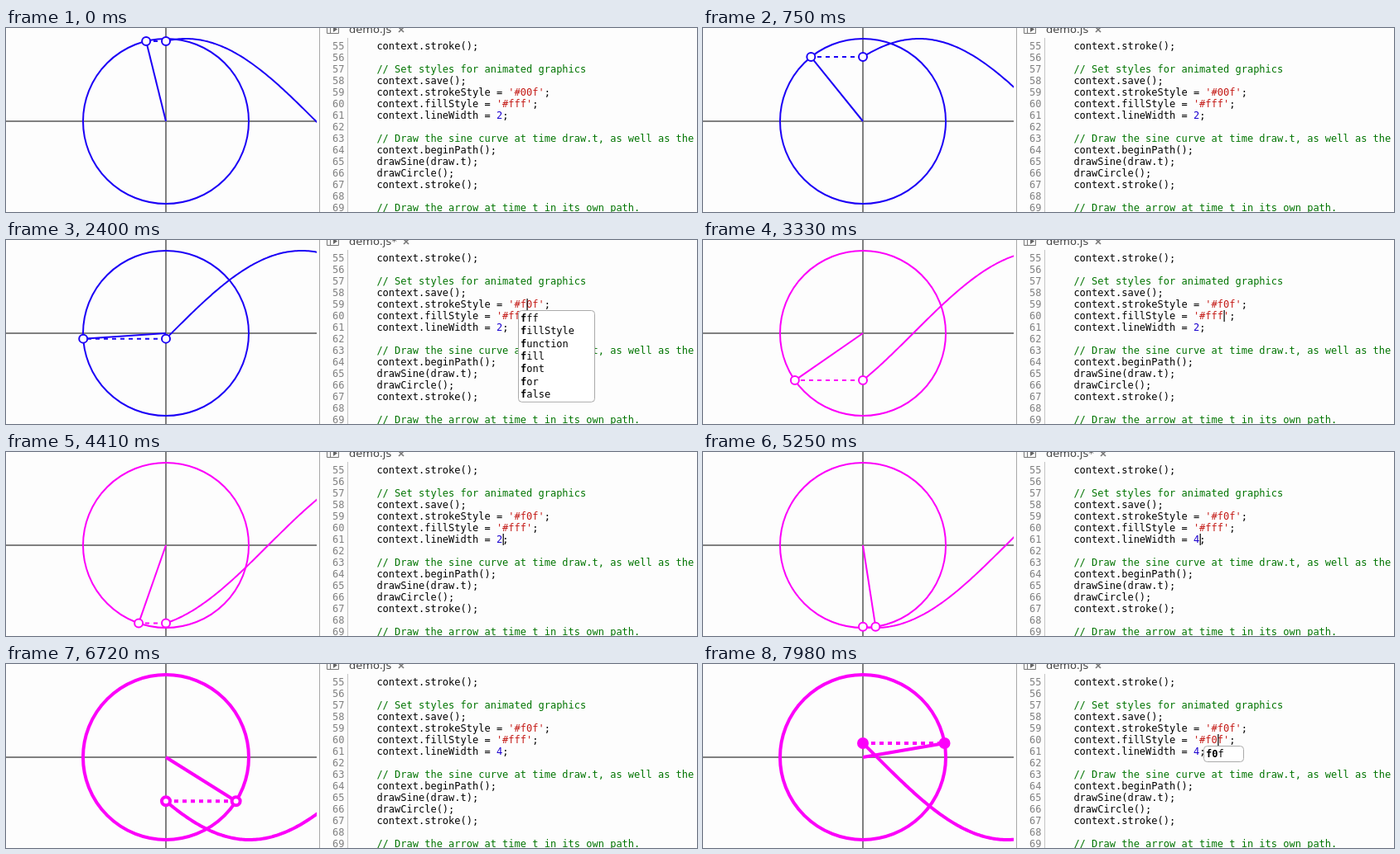
Write an HTML page that moves like this. It is 834 by 223 pixels and loops after 8000 ms.

```html
<!DOCTYPE html>
<html lang="en">
<head>
<meta charset="utf-8">
<title>Sine editor</title>
<style>
  html, body { margin: 0; width: 100%; height: 100%; overflow: hidden; background: #fdfdfd; }
  svg { display: block; }
  text { white-space: pre; }
  .code text { font: 12px "DejaVu Sans Mono", monospace; }
  .num { fill: #808080; text-anchor: end; }
  .comment { fill: #007400; }
  .string { fill: #c41a16; }
  .number { fill: #1c00cf; }
  .tab { font: 13px "DejaVu Sans", sans-serif; fill: #444; }
</style>
</head>
<body>
<svg width="834" height="223" viewBox="0 0 834 223">
  <defs><clipPath id="pane"><rect width="375" height="223"/></clipPath></defs>
  <g clip-path="url(#pane)">
    <path d="M0 113H375M193 0V223" stroke="#808080" stroke-width="2"/>
    <g id="plot" fill="none">
      <path id="wave"/>
      <circle cx="193" cy="113" r="100"/>
      <path id="arm"/>
      <path id="dash" stroke-dasharray="5 5"/>
      <circle id="tip" r="5"/>
      <circle id="foot" cx="193" r="5"/>
    </g>
  </g>
  <path d="M378.5 0V223" stroke="#a8a8a8"/>
  <path d="M412.5 12V223" stroke="#c4c4c4"/>
  <path d="M387.5 -2V6.5H401.5V-2M391.5 -2V6.5" fill="none" stroke="#777"/>
  <path d="M395 -2L400 1.5L395 5Z" fill="#666"/>
  <text class="tab" id="tab" x="414" y="6"></text>
  <path id="close" d="M474 -1L480 5M480 -1L474 5" stroke="#777" stroke-width="1.6"/>
  <g class="code">
    <g id="lines"></g>
    <rect id="caret" width="1.2" height="14"/>
    <g id="hints"></g>
  </g>
</svg>
<script>
const $ = id => document.getElementById(id);
const LOOP = 8000, CX = 193, CY = 113, R = 100;
const LEFT = 447.4, CHAR = 7.224, FIRST = 55, ROW = 14;
const BLUE = '#1c00f6', PINK = '#fc00fa', WHITE = '#fff';
const WORDS = ['fff', 'fillStyle', 'function', 'fill', 'font', 'for', 'false'];

// [time, value] steps; the last one reached holds
const STROKE = [[0, '#00f'], [1860, '#0f'], [2100, '#f0f']];
const FILL = [[0, '#fff'], [6750, '#ff'], [6900, '#f0f']];
const WIDTH = [[0, '2'], [4620, ''], [4860, '4']];
const INK = [[0, BLUE], [2790, PINK]];
const DOT = [[0, WHITE], [7230, PINK]];
const WEIGHT = [[0, 2], [5745, 4]];
const DIRTY = [[0, false], [1890, true], [2760, false], [4950, true],
  [5670, false], [6780, true], [7200, false]];
const POPUP = [[0, ''], [2100, 'f'], [3150, ''], [6900, 'f0']];
// caret: [time, [line, column]]; each step restarts the blink
const CARET = [[0, null], [1380, [59, 25]], [1860, [59, 24]], [2100, [59, 25]],
  [3150, [60, 25]], [3900, [61, 21]], [4620, [61, 20]], [4860, [61, 21]],
  [6150, [60, 24]], [6750, [60, 23]], [6900, [60, 24]]];

const step = (list, t) => list.filter(s => s[0] <= t).pop();
const at = (list, t) => step(list, t)[1];
const span = (kind, s) => `<tspan class="${kind}">${s}</tspan>`;
const col = n => LEFT + n * CHAR;
const base = line => 26 + (line - FIRST) * ROW;
const set = (id, attrs) => {
  for (const k in attrs) $(id).setAttribute(k, attrs[k]);
};

const source = [
  'context.stroke();', '',
  span('comment', '// Set styles for animated graphics'),
  'context.save();', '', '', '', '',
  span('comment', '// Draw the sine curve at time draw.t, as well as the'),
  'context.beginPath();', 'drawSine(draw.t);', 'drawCircle();', 'context.stroke();', '',
  span('comment', '// Draw the arrow at time t in its own path.')
];
$('lines').innerHTML = source.map((s, i) => {
  const line = FIRST + i, y = base(line);
  return `<text class="num" x="408.5" y="${y}">${line}</text>` +
    `<text id="l${line}" x="${LEFT}" y="${y}">${s}</text>`;
}).join('');

const cache = {};
function html(id, s) {
  if (cache[id] !== s) $(id).innerHTML = cache[id] = s;
}

function hintBox(prefix) {
  if (!prefix) return '';
  const many = prefix === 'f';
  const words = many ? WORDS : ['f0f'];
  const x = many ? 618.5 : 604.5, y = many ? 85.5 : 99.5;
  const w = many ? 92 : 48, h = 15.3 * words.length + 3.7;
  return `<rect x="${x}" y="${y}" width="${w}" height="${h}" rx="4" fill="#fff" stroke="#aaa"/>` +
    words.map((s, i) => `<text x="${x + 2.5}" y="${y + 13.5 + i * 15.3}">` +
      `<tspan font-weight="bold">${prefix}</tspan>${s.slice(prefix.length)}</text>`).join('');
}

function drawPlot(t) {
  const a = (103.8 + Math.floor(t / 30)) * Math.PI / 180;
  const x = CX + R * Math.cos(a), y = CY - R * Math.sin(a);
  let wave = '';
  for (let u = 0; u <= 184; u += 2) {
    wave += (u ? 'L' : 'M') + (CX + u) + ' ' + (CY - R * Math.sin(a - u / R)).toFixed(2);
  }
  set('plot', { stroke: at(INK, t), 'stroke-width': at(WEIGHT, t) });
  set('wave', { d: wave });
  set('arm', { d: `M${CX} ${CY}L${x} ${y}` });
  set('dash', { d: `M${CX} ${y}H${x}` });
  set('tip', { cx: x, cy: y, fill: at(DOT, t) });
  set('foot', { cy: y, fill: at(DOT, t) });
}

function drawEditor(t) {
  const dirty = at(DIRTY, t);
  html('l59', `context.strokeStyle = ${span('string', `'${at(STROKE, t)}'`)};`);
  html('l60', `context.fillStyle = ${span('string', `'${at(FILL, t)}'`)};`);
  html('l61', `context.lineWidth = ${span('number', at(WIDTH, t))};`);
  html('tab', dirty ? 'demo.js*' : 'demo.js');
  set('close', { transform: `translate(${dirty ? 6 : 0})` });
  html('hints', hintBox(at(POPUP, t)));

  const [since, pos] = step(CARET, t);
  const on = pos && (t - since) % 1060 < 530;
  set('caret', { visibility: on ? 'visible' : 'hidden' });
  if (pos) set('caret', { x: col(pos[1]) + 0.5, y: base(pos[0]) - 11 });
}

function frame() {
  const t = performance.now() % LOOP;
  drawPlot(t);
  drawEditor(t);
  requestAnimationFrame(frame);
}
frame();
</script>
</body>
</html>
```
